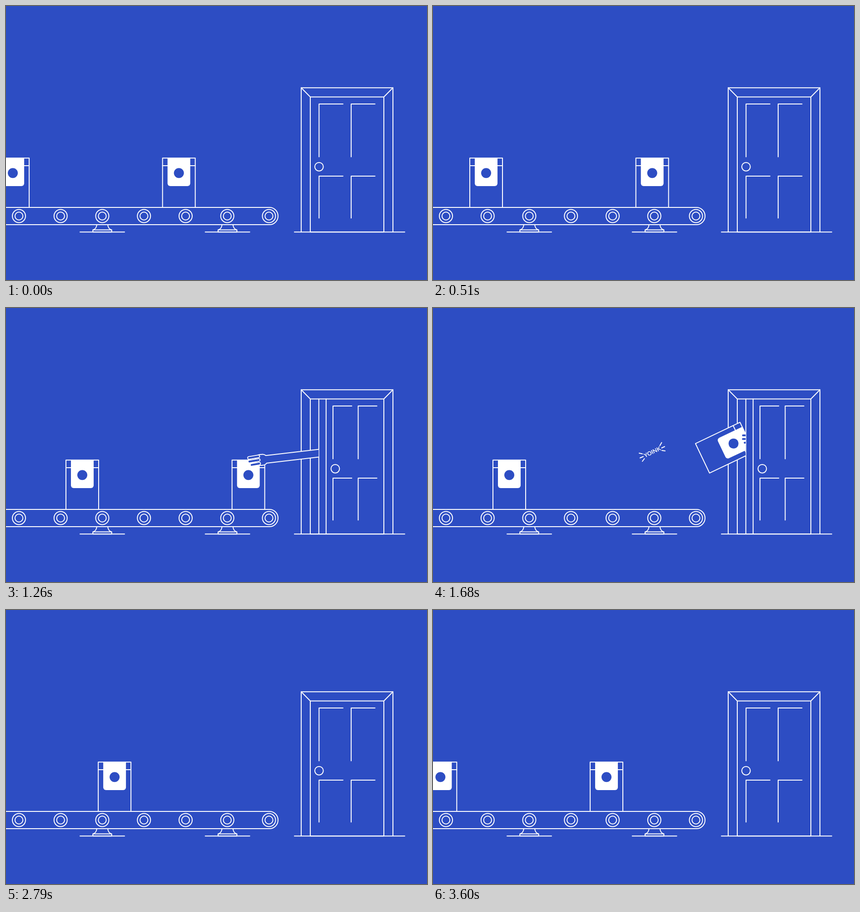
Write an HTML page with a canvas that moves like this. It is 927x604 px and loops after 3630 ms.

```html
<!DOCTYPE html>
<html lang="en">
<head>
<meta charset="utf-8">
<title>Conveyor and door</title>
<style>
html, body { margin: 0; width: 100%; height: 100%; overflow: hidden; background: #2d4dc3; }
canvas { display: block; }
</style>
</head>
<body>
<canvas id="stage" width="927" height="604"></canvas>
<script>
const ctx = document.getElementById('stage').getContext('2d');
const BLUE = '#2d4dc3', WHITE = '#fff';
const LOOP = 3630, STEP = 30, SPACING = 365.7;
const BOX = { w: 72, h: 108.7, top: 335.3 };
const BELT_STOP = 765, BELT_START = 1945, REST_X = 132;
const PULL_START = 1530, PULL_END = 1770;

const clamp01 = v => Math.max(0, Math.min(1, v));
const progress = (t, from, to) => clamp01((t - from) / (to - from));
const smooth = p => p * p * (3 - 2 * p);
const mix = (a, b, p) => a + (b - a) * p;

function line(...pts) {
  ctx.beginPath();
  for (let i = 0; i < pts.length; i += 2) ctx.lineTo(pts[i], pts[i + 1]);
  ctx.stroke();
}

function circle(x, y, r) {
  ctx.beginPath();
  ctx.arc(x, y, r, 0, Math.PI * 2);
}

function ring(x, y, r) {
  circle(x, y, r);
  ctx.stroke();
}

function drawFoot(x) {
  line(x - 49, 498.2, x + 49, 498.2);
  ctx.beginPath();
  for (const side of [-1, 1]) {
    ctx.moveTo(x + side * 12, 482);
    ctx.quadraticCurveTo(x + side * 13, 491, x + side * 20, 493.5);
  }
  ctx.stroke();
  ctx.strokeRect(x - 20.7, 493.5, 41.4, 4.7);
}

function drawConveyor() {
  ctx.beginPath();
  ctx.moveTo(-5, 444);
  ctx.lineTo(580, 444);
  ctx.arc(580, 463, 19, -Math.PI / 2, Math.PI / 2);
  ctx.lineTo(-5, 482);
  ctx.stroke();
  for (let i = 0; i < 7; i++) {
    const x = 28.5 + i * 91.75;
    ring(x, 463, 14.5);
    ring(x, 463, 8.7);
  }
  drawFoot(212);
  drawFoot(487.7);
}

// Local origin: middle of the top edge.
function drawBox() {
  const half = BOX.w / 2;
  ctx.fillStyle = BLUE;
  ctx.fillRect(-half, 0, BOX.w, BOX.h);
  ctx.strokeRect(-half, 0, BOX.w, BOX.h);
  line(-half, 16.7, half, 16.7);
  ctx.fillStyle = WHITE;
  ctx.beginPath();
  ctx.roundRect(-25, -0.5, 50, 62.3, [0, 0, 6, 6]);
  ctx.fill();
  ctx.fillStyle = BLUE;
  circle(0, 33, 11);
  ctx.fill();
}

function drawStandingBox(x, tilt) {
  ctx.save();
  ctx.translate(x + BOX.w, BOX.top + BOX.h);
  ctx.rotate(tilt * Math.PI / 180);
  ctx.translate(-BOX.w / 2, -BOX.h);
  drawBox();
  ctx.restore();
}

function beltX(t) {
  if (t < BELT_STOP) return -21 + 0.2 * t;
  const u = Math.max(0, t - BELT_START);
  return REST_X + 1.22e-4 * u * u - 2.65e-8 * u ** 3;
}

function drawDoor(open) {
  const scale = 1 - 0.215 * open;
  const doorX = x => 832 - (832 - x) * scale;
  ctx.strokeRect(670, 200.5, 162, 297.7);
  line(650, 498, 650, 180.3, 852, 180.3, 852, 498);
  line(650, 180.3, 670, 200.5);
  line(852, 180.3, 832, 200.5);
  line(635, 498.2, 878, 498.2);
  for (const [left, right] of [[689.3, 742], [760, 812.5]]) {
    line(doorX(right), 216, doorX(left), 216, doorX(left), 332.5);
    line(doorX(right), 375, doorX(left), 375, doorX(left), 467.5);
  }
  if (open > 0) {
    const edge = doorX(670);
    line(edge, 200.5, edge, 498);
    line(edge - 16 * open, 200.5, edge - 16 * open, 498);
  }
  ring(doorX(689.3) + 5 * open, 354.3, 9.4);
}

function drawHand(x, y) {
  ctx.save();
  ctx.translate(x, y);
  ctx.rotate(Math.atan2(289 - y, 920 - x));
  for (const [color, extra] of [[WHITE, 4], [BLUE, 0]]) {
    ctx.strokeStyle = color;
    ctx.lineWidth = 15 + extra;
    line(24, 4, 400, 4);
    ctx.lineWidth = 22 + extra;
    line(16, 4, 20, 4);
  }
  [[-9, -3.5], [-9, 4.5], [-5, 12.5]].forEach(([tip, row]) => {
    for (const [color, width] of [[WHITE, 7.5], [BLUE, 4]]) {
      ctx.strokeStyle = color;
      ctx.lineWidth = width;
      line(tip, row, 12, row - 1);
    }
  });
  ctx.restore();
}

function drawYoink(t) {
  if (t < 1560 || t >= 1920) return;
  const size = mix(0.5, 1, progress(t, 1530, 1620));
  ctx.save();
  ctx.translate(483, 317.5);
  ctx.scale(size, size);
  for (const [x1, y1, x2, y2] of [
    [-29, 2.5, -22, 4], [-27, 13, -20, 10], [-22, 20.5, -17.5, 14.5],
    [16.5, -14, 20.5, -21], [20.5, -9, 27, -12], [21, -3.5, 28, -2.5]
  ]) line(x1, y1, x2, y2);
  ctx.rotate(-26 * Math.PI / 180);
  ctx.font = '700 12.5px Lato, sans-serif';
  ctx.textAlign = 'center';
  ctx.textBaseline = 'middle';
  ctx.fillStyle = WHITE;
  ctx.fillText('YOINK', 0, 0.5);
  ctx.restore();
}

function drawGrab(t, restX) {
  if (t < 1080 || t >= PULL_END) return;
  const reach = smooth(progress(t, 1080, 1290));
  const pull = Math.max(0, (t - PULL_START) / 150) ** 1.4;
  const grabX = restX + BOX.w / 2;
  const x = mix(grabX, 691.5, pull);
  const y = mix(BOX.top, 284.5, pull);
  ctx.save();
  ctx.beginPath();
  ctx.rect(0, 0, 688.5, 604);
  ctx.clip();
  ctx.save();
  ctx.translate(x, y);
  ctx.rotate(64.5 * Math.min(pull, 1.1) * Math.PI / 180);
  drawBox();
  ctx.restore();
  drawHand(mix(725, x, reach), mix(292, y, reach));
  ctx.restore();
}

function draw(t) {
  ctx.fillStyle = BLUE;
  ctx.fillRect(0, 0, 927, 604);
  ctx.strokeStyle = WHITE;
  ctx.lineWidth = 2;
  ctx.lineCap = ctx.lineJoin = 'round';

  drawConveyor();
  drawDoor(smooth(progress(t, 840, 1050)) - smooth(progress(t, 1800, 2010)));

  const x = beltX(t);
  const jolt = Math.sin(progress(t, BELT_STOP, 945) * Math.PI);
  drawStandingBox(x, 3.1 * jolt);
  if (t < 1080) drawStandingBox(x + SPACING, 3.8 * jolt);
  if (t > BELT_START) drawStandingBox(x - SPACING, 0);
  drawGrab(t, REST_X + SPACING);
  drawYoink(t);
}

const start = performance.now();
function tick() {
  const t = (performance.now() - start) % LOOP;
  draw(Math.floor(t / STEP) * STEP);
  requestAnimationFrame(tick);
}
tick();
</script>
</body>
</html>
```
